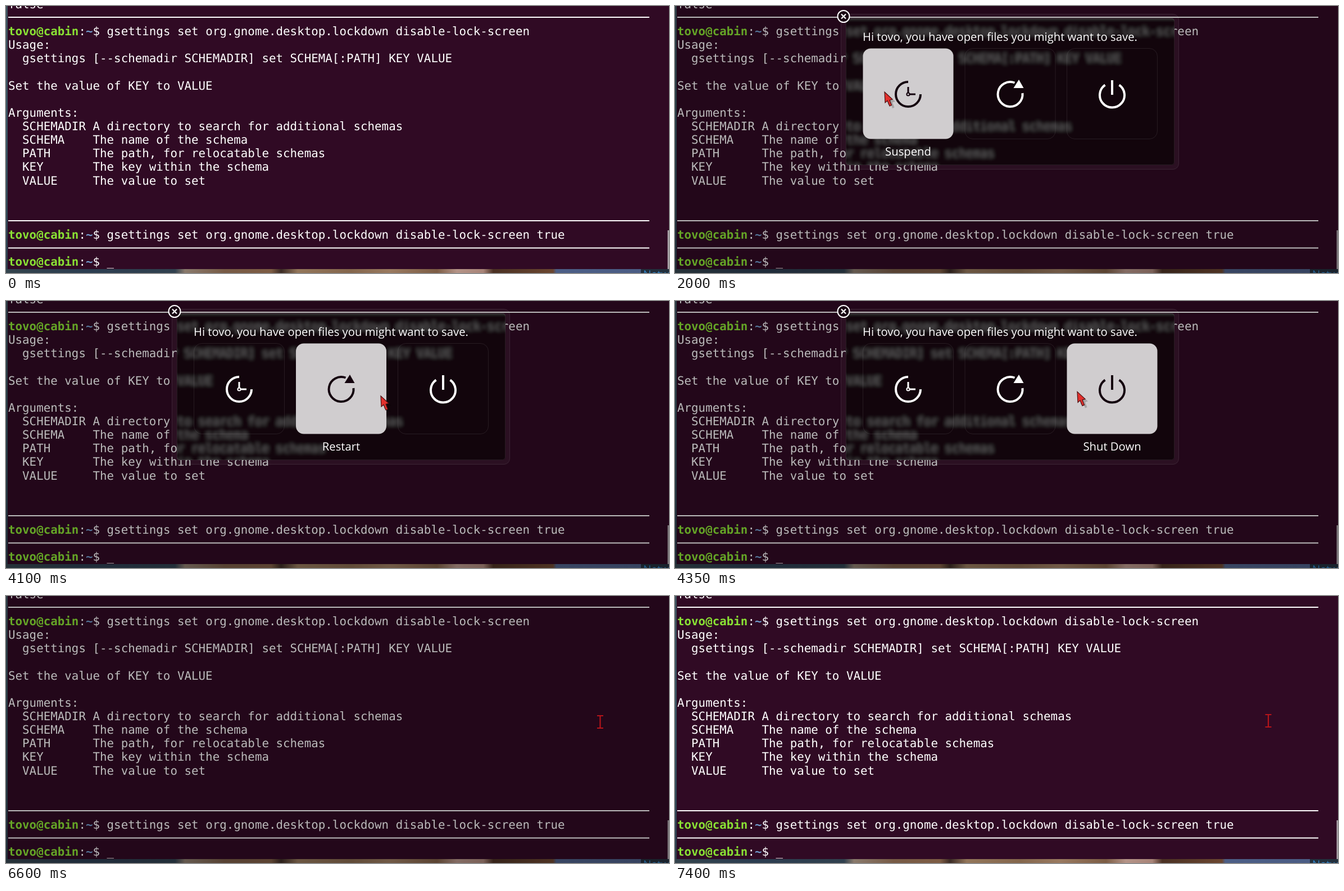
Recreate the animation shown at these times as an HTML page. Size 1180 by 475 pixels, loop 8 s.

```html
<!DOCTYPE html>
<html lang="en">
<head>
<meta charset="utf-8">
<title>Power dialog</title>
<style>
  html, body { margin: 0; width: 100%; height: 100%; overflow: hidden; background: #300a24; }
  svg { display: block; width: 1180px; height: 475px; }
  text { white-space: pre; text-rendering: geometricPrecision; }
  #lines { font: 20.83px "DejaVu Sans Mono", monospace; fill: #fff; }
  .host { font-weight: bold; fill: #8ae234; }
  .dir { font-weight: bold; fill: #729fcf; }
  #dialog text { font: 20.25px "Open Sans", "Noto Sans", sans-serif; fill: #fff; }
  .box { fill: none; stroke: #fff; stroke-opacity: .09; }
  .icon { color: #fff; fill: none; stroke: currentColor; stroke-width: 4; }
  .tile text { visibility: hidden; text-anchor: middle; }
  .hover .box { fill: #d0cdcf; stroke: none; }
  .hover .icon { color: #14030e; }
  .hover text { visibility: inherit; }
</style>
</head>
<body>
<svg viewBox="0 0 1180 475">
  <defs>
    <linearGradient id="photo">
      <stop offset="0" stop-color="#33434c"/>
      <stop offset=".12" stop-color="#2b3d50"/>
      <stop offset=".255" stop-color="#30404e"/>
      <stop offset=".27" stop-color="#8a7a6c"/>
      <stop offset=".33" stop-color="#775a45"/>
      <stop offset=".4" stop-color="#7d5c44"/>
      <stop offset=".415" stop-color="#3a2a24"/>
      <stop offset=".44" stop-color="#93765a"/>
      <stop offset=".52" stop-color="#84664c"/>
      <stop offset=".58" stop-color="#9a7a60"/>
      <stop offset=".65" stop-color="#7c5c44"/>
      <stop offset=".68" stop-color="#b59488"/>
      <stop offset=".72" stop-color="#a88478"/>
      <stop offset=".735" stop-color="#4a3022"/>
      <stop offset=".825" stop-color="#6b4630"/>
      <stop offset=".83" stop-color="#4c5e86"/>
      <stop offset="1" stop-color="#4a5c84"/>
    </linearGradient>
    <linearGradient id="edge" x2="0" y2="1">
      <stop offset="0" stop-color="#3d525e"/>
      <stop offset=".5" stop-color="#375260"/>
      <stop offset="1" stop-color="#2b3d4c"/>
    </linearGradient>
    <filter id="blur" filterUnits="userSpaceOnUse" x="0" y="0" width="1180" height="475">
      <feGaussianBlur stdDeviation="3.2"/>
    </filter>
    <clipPath id="inner"><rect x="304" y="22" width="585" height="261" rx="5"/></clipPath>
  </defs>

  <g id="term">
    <rect width="1180" height="475" fill="#300a24"/>
    <rect width="3" height="475" fill="url(#edge)"/>
    <rect y="468" width="1180" height="7" fill="url(#photo)"/>
    <rect x="1130" y="468" width="50" height="7" fill="#222f3c"/>
    <text x="1134" y="484" font-size="19" font-family="Open Sans, sans-serif" fill="#3182c4">Network</text>
    <rect x="1177.5" y="399" width="2.5" height="69" fill="#aaa3a8"/>
    <path d="M4 20H1145M4 382H1145M4 430.5H1145" stroke="#fff" stroke-width="1.8"/>
    <g id="lines"></g>
  </g>
  <rect id="dim" width="1180" height="475"/>

  <g id="dialog">
    <rect x="295.5" y="14.5" width="601" height="276" rx="10" fill="#fff" fill-opacity=".035" stroke="#fff" stroke-opacity=".1"/>
    <g clip-path="url(#inner)">
      <use href="#term" filter="url(#blur)"/>
      <rect width="1180" height="475" opacity=".63"/>
    </g>
    <rect class="box" x="304.5" y="22.5" width="584" height="260" rx="5"/>
    <text x="334" y="61.5">Hi tovo, you have open files you might want to save.</text>
    <g id="tiles"></g>
    <g transform="translate(300 18.5)" stroke="#fff" stroke-width="2">
      <circle r="10.5" fill="#1a0513"/>
      <path d="M-4-4L4 4M4-4L-4 4" stroke-width="2.3"/>
    </g>
  </g>

  <g id="arrow">
    <path d="M0 0L1 19L5 15.5L9 25L12.5 23.5L9 14.5L14 13Z" transform="translate(5 4)" opacity=".2"/>
    <path d="M0 0L1 19L5 15.5L9 25L12.5 23.5L9 14.5L14 13Z" fill="#e2302d" stroke="#4d1012" stroke-width="1.2"/>
  </g>
  <path id="beam" d="M-5.5-11H5.5M-5.5 11H5.5M0-11V11" stroke="#b5141a" stroke-width="2.2"/>
</svg>

<script>
const $ = id => document.getElementById(id);
const LOOP = 8000, DIM = 0.27;

const prompt = '<tspan class="host">tovo@cabin</tspan>:<tspan class="dir">~</tspan>$ ';
const command = prompt + 'gsettings set org.gnome.desktop.lockdown disable-lock-screen';
const rows = [
  'false', '', command, 'Usage:',
  '  gsettings [--schemadir SCHEMADIR] set SCHEMA[:PATH] KEY VALUE', '',
  'Set the value of KEY to VALUE', '',
  'Arguments:',
  '  SCHEMADIR A directory to search for additional schemas',
  '  SCHEMA    The name of the schema',
  '  PATH      The path, for relocatable schemas',
  '  KEY       The key within the schema',
  '  VALUE     The value to set',
  '', '', '', command + ' true', '', prompt + '_'
];
$('lines').innerHTML = rows.map((row, i) =>
  `<text x="4" y="${(4 + 24.12 * i).toFixed(2)}">${row}</text>`).join('');

const solid = 'fill="currentColor" stroke="none"';
const tiles = [
  { x: 334, label: 'Suspend', icon:
    '<path d="M0-22A22 22 0 1 0 22 0"/><path d="M0-3V-13M3 0H13" stroke-width="3"/><circle r="2.6" stroke-width="2"/>' },
  { x: 515.5, label: 'Restart', icon:
    `<path d="M8-20.5A22 22 0 1 0 22-2"/><path d="M15.5-26L6-11H24Z" ${solid}/>` },
  { x: 697, label: 'Shut Down', icon:
    '<path d="M-12.5-16.5A22 22 0 1 0 12.5-16.5M0-25V1"/>' }
];
$('tiles').innerHTML = tiles.map(({ x, label, icon }) => `
  <g class="tile" transform="translate(${x} 75)">
    <rect class="box" x=".5" y=".5" width="161" height="161" rx="14"/>
    <g class="icon" transform="translate(81 82)">${icon}</g>
    <text x="81" y="191">${label}</text>
  </g>`).join('');
const tileNodes = [...$('tiles').children];

// Pointer moves: start, end, number of steps, destination
const home = [237, 46];
const moves = [
  [1500, 2000, 6, 373, 153],
  [2950, 3200, 4, 564, 172],
  [3750, 4100, 5, 667, 169],
  [4300, 4350, 2, 716, 161.4],
  [5600, 6050, 6, 1055, 223]
];
const smooth = p => p * p * (3 - 2 * p);
const clamp = p => Math.max(0, Math.min(1, p));

function pointer(t) {
  let [x, y] = home;
  for (const [start, end, steps, toX, toY] of moves) {
    if (t < start) break;
    const k = Math.floor(clamp((t - start) / (end - start)) * (steps - 1) + 1e-6);
    const p = smooth((k + 1) / steps);
    x += (toX - x) * p;
    y += (toY - y) * p;
  }
  return [x, y];
}

const show = (node, on) => node.setAttribute('visibility', on ? 'visible' : 'hidden');
const place = (node, x, y) => node.setAttribute('transform', `translate(${x} ${y})`);

function draw(t) {
  const open = t >= 500 && t < 6600;
  const fade = clamp((t - 6600) / 600);
  const [x, y] = pointer(t);

  $('dim').setAttribute('opacity', t < 500 ? 0 : DIM * (1 - fade));
  show($('dialog'), open);
  tileNodes.forEach((node, i) => {
    const dx = x - tiles[i].x, dy = y - 75;
    node.classList.toggle('hover', open && dx >= 0 && dx <= 162 && dy >= 0 && dy <= 162);
  });

  show($('arrow'), open && t >= 1500);
  place($('arrow'), x, y);
  show($('beam'), t >= 6600);
  place($('beam'), t < 7400 ? 1057.5 : 1056, t < 7400 ? 224 : 222);
}

let origin;
function tick(now) {
  origin ??= now;
  draw((now - origin) % LOOP);
  requestAnimationFrame(tick);
}
draw(0);
requestAnimationFrame(tick);
</script>
</body>
</html>
```
